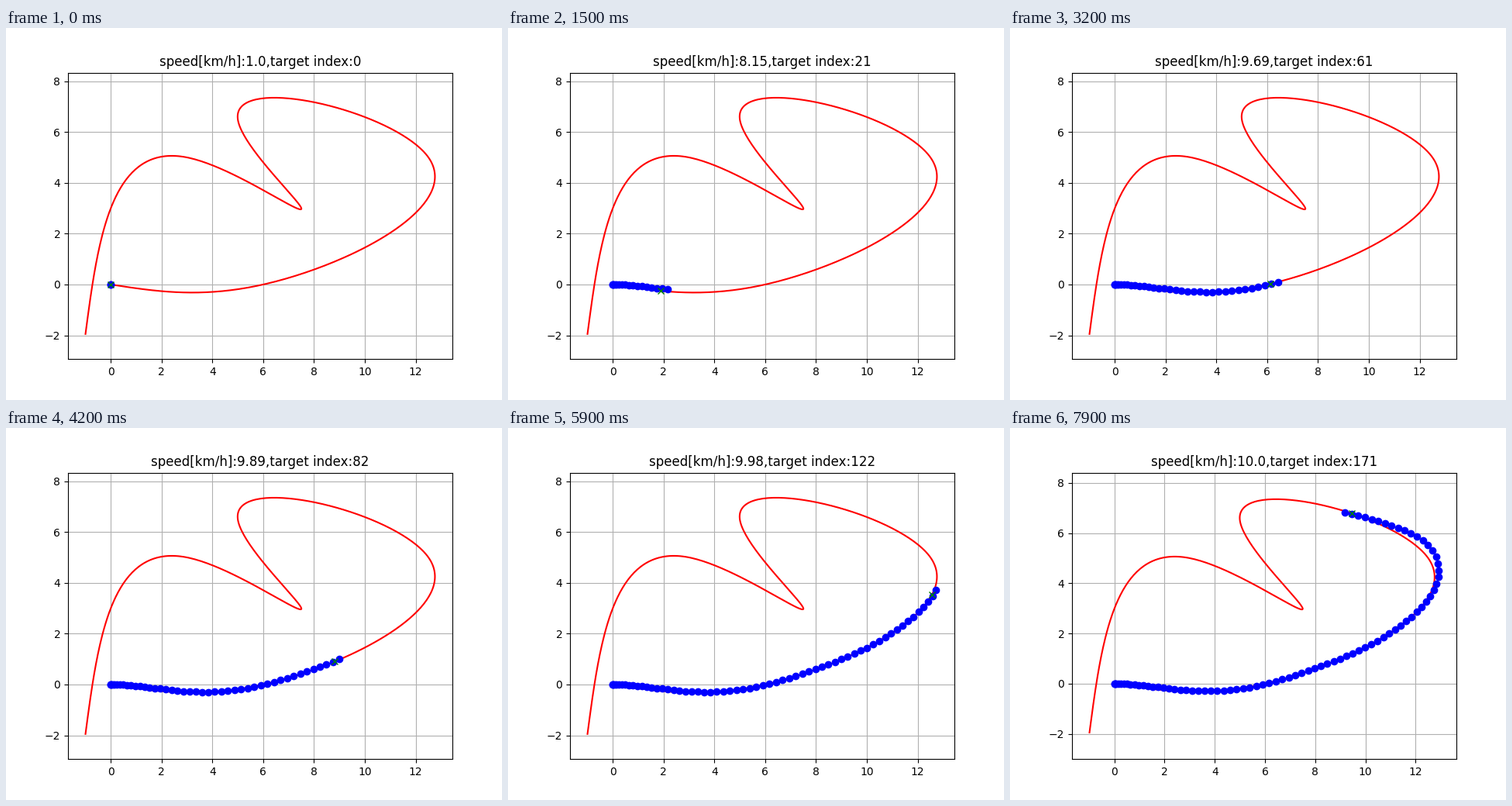
A matplotlib script that plays this animation: 640x480 px, repeating every 8 s.

```python
import math

import matplotlib.pyplot as plt
import numpy as np
from matplotlib.animation import FuncAnimation

FRAMES = 80
DT = 0.1            # time step [s]
KP = 1.0            # speed gain
KTH, KE = 1.0, 0.5  # heading and lateral error gains
WHEELBASE = 2.9
TARGET_SPEED = 10.0 / 3.6

WAY_X = [0.0, 6.0, 12.5, 5.0, 7.5, 3.0, -1.0]
WAY_Y = [0.0, 0.0, 5.0, 6.5, 3.0, 5.0, -2.0]


def wrap(angle):
    return (angle + math.pi) % (2 * math.pi) - math.pi


def natural_spline(knots, values, s):
    """Value, first and second derivative of a natural cubic spline."""
    a = np.asarray(values)
    h = np.diff(knots)
    n = len(a)
    system, rhs = np.eye(n), np.zeros(n)
    for i in range(1, n - 1):
        system[i, i - 1:i + 2] = h[i - 1], 2 * (h[i - 1] + h[i]), h[i]
        rhs[i] = 3 * ((a[i + 1] - a[i]) / h[i] - (a[i] - a[i - 1]) / h[i - 1])
    c = np.linalg.solve(system, rhs)
    d = np.diff(c) / (3 * h)
    b = np.diff(a) / h - h * (c[1:] + 2 * c[:-1]) / 3

    i = np.clip(np.searchsorted(knots, s, side="right") - 1, 0, n - 2)
    t = s - knots[i]
    return (a[i] + b[i] * t + c[i] * t**2 + d[i] * t**3,
            b[i] + 2 * c[i] * t + 3 * d[i] * t**2,
            2 * c[i] + 6 * d[i] * t)


def make_course(step=0.1):
    chords = np.hypot(np.diff(WAY_X), np.diff(WAY_Y))
    knots = np.concatenate([[0], np.cumsum(chords)])
    s = np.arange(0, knots[-1], step)
    x, dx, ddx = natural_spline(knots, WAY_X, s)
    y, dy, ddy = natural_spline(knots, WAY_Y, s)
    return x, y, np.arctan2(dy, dx), (ddy * dx - ddx * dy) / (dx**2 + dy**2)


def nearest(x, y):
    dist = np.hypot(cx - x, cy - y)
    i = int(np.argmin(dist))
    side = wrap(cyaw[i] - math.atan2(cy[i] - y, cx[i] - x))
    return i, -dist[i] if side < 0 else dist[i]


def steer(v, yaw, i, e):
    """Rear wheel feedback law."""
    th = wrap(yaw - cyaw[i])
    if v == 0 or th == 0:
        return 0.0
    omega = (v * ck[i] * math.cos(th) / (1 - ck[i] * e)
             - KTH * abs(v) * th
             - KE * v * math.sin(th) * e / th)
    return math.atan2(WHEELBASE * omega / v, 1.0)


def drive():
    x = y = yaw = v = 0.0
    xs, ys, speeds, targets = [x], [y], [], []
    for _ in range(FRAMES):
        i, e = nearest(x, y)
        delta = steer(v, yaw, i, e)
        x += v * math.cos(yaw) * DT
        y += v * math.sin(yaw) * DT
        yaw += v / WHEELBASE * math.tan(delta) * DT
        v += KP * (TARGET_SPEED - v) * DT
        xs.append(x)
        ys.append(y)
        speeds.append(v)
        targets.append(i)
    return xs, ys, speeds, targets


cx, cy, cyaw, ck = make_course()
xs, ys, speeds, targets = drive()

fig, ax = plt.subplots(figsize=(6.4, 4.8), dpi=100)


def draw(frame):
    i = targets[frame]
    ax.cla()
    ax.plot(cx, cy, "-r")
    ax.plot(xs[:frame + 2], ys[:frame + 2], "ob")
    ax.plot(cx[i], cy[i], "xg")
    ax.axis("equal")
    ax.grid(True)
    ax.set_title(f"speed[km/h]:{round(speeds[frame] * 3.6, 2)},target index:{i}")


anim = FuncAnimation(fig, draw, frames=FRAMES, interval=100, repeat=True,
                     repeat_delay=0, init_func=lambda: None)
plt.show()
```
